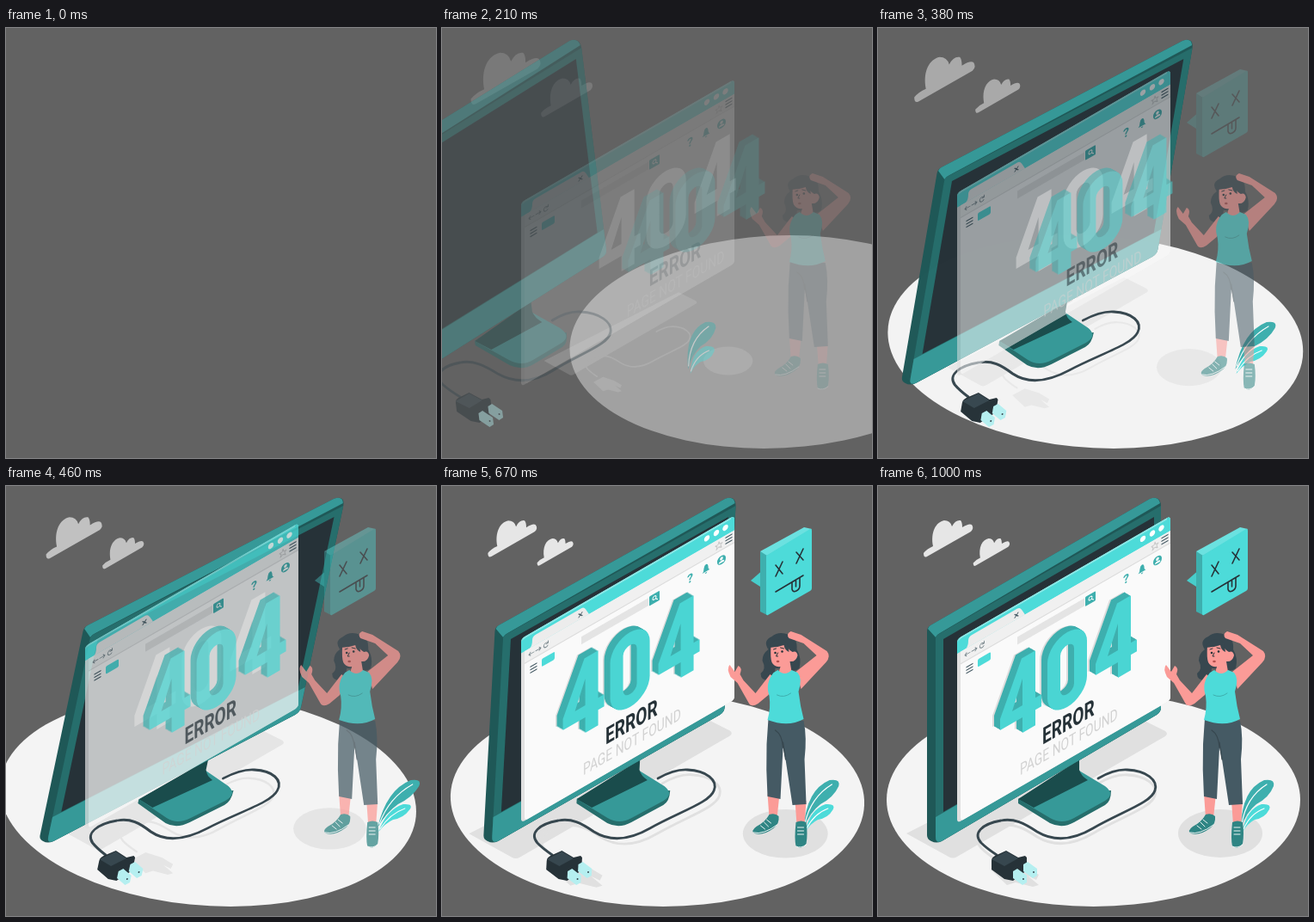
These frames come from a looping animation (500x500 px, 1.04 s). An HTML page:

```html
<!DOCTYPE html>
<html lang="en">
<head>
<meta charset="utf-8">
<title>404 error</title>
<style>
html, body { margin: 0; height: 100%; overflow: hidden; background: #626262; }
svg { display: block; width: 100%; height: 100%; }
text { font-family: Roboto, "Liberation Sans", sans-serif; }
.line { fill: none; stroke-linecap: round; stroke-linejoin: round; }
</style>
</head>
<body>
<svg viewBox="0 0 500 500">
<defs>
  <path id="cable" class="line" stroke-width="2.8" d="M256 340Q275 329 290 330C312 331 326 342 322 354C318 368 285 378 250 398C228 411 205 414 185 402C170 392 158 386 143 389C120 393 110 404 120 415Q126 421 138 429"/>
  <path id="prong" d="M157 448l5-3 11 8v8l-5 3-11-8z"/>
  <path id="cloudShape" d="M53 78Q57 73 64 70C61 54 67 42 77 40Q84 40 86 47Q90 39 96 40Q98 42 98 48Q106 43 109 45Q112 49 108 53L57 82Q53 84 53 78Z"/>
  <path id="four" d="M25 0H41V55H48V69H41V87H26V69H0V56ZM26 24V55H14Z" fill-rule="evenodd"/>
  <path id="zero" d="M0 23a23 23 0 0 1 46 0V64a23 23 0 0 1-46 0ZM15 23a8 8 0 0 1 16 0V64a8 8 0 0 1-16 0Z" fill-rule="evenodd"/>
  <g id="digits" transform="matrix(1 -.577 0 1 142 215)">
    <use href="#four"/><use href="#zero" x="55"/><use href="#four" x="111"/>
  </g>
  <path id="menu" class="line" stroke="#455a64" stroke-width="1.3" d="M0 0h7M0 3.5h7M0 7h7"/>
</defs>

<ellipse id="floor" cx="250.5" cy="365" rx="240.5" ry="124" fill="#f4f4f4"/>

<g id="shade" fill="#e0e0e0">
  <path d="M33 404L300 268L334 285Q338 288 334 291L92 431Q87 434 82 431Z"/>
  <use href="#cable" y="6" stroke="#e0e0e0"/>
  <path d="M131 446L150 436L172 443L187 452L184 458L174 453L187 464L180 466L160 461L150 464Z"/>
  <ellipse cx="398" cy="404" rx="49" ry="28"/>
</g>

<g id="clouds" fill="#e6e6e6">
  <use href="#cloudShape"/>
  <use href="#cloudShape" transform="translate(71.5 31) scale(.74 .75)"/>
</g>

<g id="monitor">
  <path fill="#266e6c" d="M163 364V369L200 392Q214 399 228 391L264 371Q271 367 271 354Z"/>
  <path fill="#369998" d="M163 364L200 386Q214 394 228 386L264 366Q276 358 264 349L234 331Z"/>
  <path fill="#1a4c4c" d="M163 364L234 318V330Q236 337 244 342L181 374Z"/>
  <path fill="#1f5857" d="M57 169Q57 164 61 162L316 15Q329 10 329 24V257Q329 263 324 266L74 413Q68 416 62 413Q57 411 57 406Z"/>
  <path fill="#369998" d="M58 166Q59 163 61 162L316 15Q326 11 328 20L72 171Q68 173 67 176Z"/>
  <path fill="#266e6c" d="M67 177Q67 174 71 172L329 23V257Q329 263 324 266L74 413Q67 416 67 408Z"/>
  <path fill="#369998" d="M67 385L329 234V257Q329 263 324 266L74 413Q67 416 67 408Z"/>
  <path fill="#263238" d="M76 178L321 36V238L76 379Z"/>
  <use href="#cable" stroke="#37474f"/>
  <path fill="#263238" d="M132 436Q132 432 136 430L149 424L163 432L171 430L173 432V447L157 459L147 457L132 446Z"/>
  <path fill="#37474f" d="M132 434L149 425L163 433L147 442Z"/>
  <g fill="#b5eff0"><use href="#prong"/><use href="#prong" x="12" y="-8"/></g>
  <g fill="#37474f"><circle cx="169" cy="457" r="1"/><circle cx="181" cy="449" r="1"/></g>
</g>

<g id="page">
  <g transform="matrix(1 -.577 0 1 92 178)">
    <rect width="248" height="214" rx="4" fill="#e0e0e0"/>
    <path fill="#fafafa" d="M4 4H248V210Q248 214 244 214H8Q4 214 4 210Z"/>
    <path fill="#4ddbd9" d="M0 17V4Q0 0 4 0H244Q248 0 248 4V17Z"/>
    <path fill="#8ae8e6" d="M1 3Q2 0 5 0H244V2H5Z"/>
    <path fill="#ececec" d="M10 17Q13 16 13 9Q13 5 17 5H70Q73 5 75 9L79 17Z"/>
    <path fill="#f0f0f0" d="M4 17H248V31H4Z"/>
    <path fill="#dcdcdc" d="M4 30.5H248V31.8H4Z"/>
    <g fill="#fff"><circle cx="216" cy="8" r="3.2"/><circle cx="227" cy="8" r="3.2"/><circle cx="237.5" cy="8" r="3.2"/></g>
    <path class="line" stroke="#455a64" stroke-width="1.1" d="M67 10l4 4M71 10l-4 4"/>
    <path class="line" stroke="#78868c" stroke-width=".9" d="M9 24h6M11 22l-2 2 2 2M17 24h6M21 22l2 2-2 2M31 22.500a2.600 2.600 0 1 0 0 3M31.500 20.500v2.500H29"/>
    <path class="line" stroke="#c8c8c8" d="M230 20l1 3h3l-2 2 1 3-3-2-3 2 1-3-2-2h3z"/>
    <use href="#menu" x="238" y="20"/>
    <use href="#menu" x="11" y="39"/>
    <rect x="24" y="37.5" width="15" height="9" rx="1.5" fill="#4ddbd9"/>
    <rect x="70" y="38" width="78" height="9" fill="#e4e4e4"/>
    <rect x="149" y="37" width="12" height="11" rx="1" fill="#3eafae"/>
    <path class="line" stroke="#fff" d="M156.5 43.5l2 2M157 42a2 2 0 1 1-4 0a2 2 0 1 1 4 0"/>
    <g fill="#3eafae">
      <text x="193" y="48" font-size="14" font-weight="700">?</text>
      <path d="M210.5 46Q212.5 45 212.5 41Q213 37.5 215 37.5T217.5 41Q217.5 45 219.5 46ZM213.5 47h3l-1.5 1.5z"/>
      <circle cx="233" cy="43" r="5"/>
    </g>
    <path fill="#fff" d="M233 39.5a1.7 1.7 0 0 1 0 3.6a1.7 1.7 0 0 1 0-3.6M229.7 46q0-2.4 3.3-2.4t3.3 2.4z"/>
  </g>
</g>

<g id="caption">
  <use href="#digits" x="-9" y="-4" fill="#dcdcdc"/>
  <text transform="matrix(.71 -.41 0 1 191 301)" font-size="27" font-weight="700" fill="#263238">ERROR</text>
  <text transform="matrix(.732 -.422 0 1 165 336.5)" font-size="19" fill="#d2d2d2">PAGE NOT FOUND</text>
</g>
<g id="number"></g>

<g id="bubble">
  <path fill="#48cdcb" d="M359 110L375 96L378 113L370 117Z"/>
  <path fill="#3eafae" d="M370 76L378 80V150L370 146Z"/>
  <path fill="#6be1e0" d="M370 76L421 48L430 50L378 81Z"/>
  <path fill="#4ddbd9" d="M377 81L428 50Q430 49 430 52V119Q430 121 428 122L379 150Q377 151 377 148Z"/>
  <path class="line" stroke="#263238" stroke-width="1.6" d="M388 92l8 10M396 88l-8 17M412 77l8 9M420 73l-8 17M388 123l32-19M407 112v8q1 4 5 2t4-6v-9M411.5 110v7"/>
</g>

<g id="plant">
  <path fill="#3eafae" d="M422 397Q423 353 449 342Q462 340 460 349Q455 362 440 370Q428 380 422 397Z"/>
  <path fill="#4ddbd9" d="M424 402Q428 376 446 370Q458 369 455 376Q450 386 438 388Q430 392 424 402Z"/>
  <path class="line" stroke="#fff" stroke-width="1.2" d="M423 393Q428 362 452 347M425 399Q433 381 449 375"/>
</g>

<g id="woman">
  <path fill="#37474f" d="M380 190Q373 180 384 175Q392 168 404 173Q414 176 413 190Q419 200 416 212Q410 217 404 213L388 212Q388 222 380 226Q371 226 371 218Q378 213 373 203Q373 195 380 190Z"/>
  <g fill="#fb9b97">
    <path d="M412 216L436 197L421 183L404 177Q400 172 406 169L418 173L448 192Q453 198 447 205L418 236Z"/>
    <path d="M388 224L380 243L368 253Q360 258 357 252L344 229L336 222Q331 212 335 208L341 216L345 209Q350 211 347 219L351 226L365 241L382 219Z"/>
    <path d="M383 185Q382 200 384 205Q387 211 394 210L392 217Q399 226 407 216L405 204Q412 205 414 197Q413 191 408 193Q402 190 401 183Q392 187 388 183Z"/>
    <path d="M379 358H393L390 386H381ZM411 366H424L422 394H413Z"/>
  </g>
  <path fill="#37474f" d="M381 188Q384 179 393 178Q403 178 404 193Q399 191 398 185Q390 188 381 188Z"/>
  <path class="line" stroke="#263238" stroke-width="1" d="M386 190l3-1M394 188l4 1M391 194l-2 4 2 0"/>
  <g fill="#263238"><circle cx="388" cy="194" r="1.3"/><circle cx="396" cy="192.5" r="1.3"/><ellipse cx="391" cy="204" rx="1.8" ry="1.2" fill="#b4514f"/></g>
  <path fill="#455a64" d="M380 270L421 273Q425 292 422 318L424 370L408 371L400 318L397 304L394 364L379 361Q377 330 378 300Z"/>
  <path class="line" stroke="#37474f" stroke-width="1.2" d="M397 304Q396 289 388 284M400 318L397 298"/>
  <path fill="#4ddbd9" d="M386 217L391 214Q399 222 407 214L414 217Q420 224 415 239Q417 256 421 271Q403 281 379 272Q383 258 381 244Q376 229 386 217Z"/>
  <path class="line" stroke="#3eafae" d="M390 243Q398 247 406 241"/>
  <path fill="#2f8584" d="M381 382Q388 380 392 384Q393 393 386 398Q374 407 364 404Q359 401 366 396Q376 391 381 382ZM412 391Q418 388 424 391Q426 405 424 416Q419 423 412 419Q410 410 412 391Z"/>
  <path class="line" stroke="#fff" stroke-width=".9" d="M375 391l5 5M378 388l5 4M371 395l5 4M414 397h7M414 401h7M414 405h7M363 403Q374 406 390 394M412 419q6 3 12-2"/>
</g>
</svg>

<script>
const $ = id => document.getElementById(id);
const LOOP = 1040, FPS = 24, DEPTH = 7;

// Extrude the digits back into the page, then put the face on top.
for (let i = DEPTH; i >= 0; i--) {
  const layer = document.createElementNS("http://www.w3.org/2000/svg", "use");
  layer.setAttribute("href", "#digits");
  layer.setAttribute("transform", `translate(${-i} ${-.577 * i})`);
  layer.setAttribute("fill", i ? "#3eafae" : "#4ad5d3");
  $("number").append(layer);
}

function bezier(x1, y1, x2, y2) {
  const at = (a, b, s) => 3 * (1 - s) ** 2 * s * a + 3 * (1 - s) * s * s * b + s ** 3;
  return x => {
    if (x <= 0 || x >= 1) return x <= 0 ? 0 : 1;
    let lo = 0, hi = 1;
    for (let i = 0; i < 24; i++) {
      const mid = (lo + hi) / 2;
      if (at(x1, x2, mid) < x) lo = mid; else hi = mid;
    }
    return at(y1, y2, lo);
  };
}
const slow = bezier(.36, -.01, .42, 1.38);
const fast = bezier(.43, -.01, .37, 1.38);

const clamp = v => Math.min(1, Math.max(0, v));

function pose(id, opacity, transform) {
  $(id).setAttribute("opacity", clamp(opacity));
  if (transform) $(id).setAttribute("transform", transform);
}
const move = (x, y = 0) => `translate(${x} ${y})`;
const zoom = (k, x, y) => `translate(${x} ${y}) scale(${k}) translate(${-x} ${-y})`;
const lean = (dx, deg, y) => `translate(${dx} ${y}) skewX(${deg}) translate(0 ${-y})`;

function leanAngle(p) {
  if (p < .6) return 20 - 30 * fast(p / .6);
  if (p < .8) return -10 + 11 * (1 - (1 - (p - .6) / .2) ** 2.4);
  return 1 - fast((p - .8) / .2);
}

function draw(p) {
  const a = slow(p), rest = 1 - a;
  const b = fast(p / .6), dash = 245 * (1 - b), angle = leanAngle(p);
  pose("floor", b, lean(dash, -angle, 365));
  pose("monitor", b, lean(-dash, angle, 250));
  pose("plant", b, lean(-dash, angle, 372));
  pose("shade", a, zoom(1 - rest / 2, 240, 363));
  pose("clouds", a, zoom(1 + rest / 2, 100, 67));
  pose("page", a, move(0, 30 * rest));
  pose("caption", a, move(60 * rest));
  pose("number", a, move(90 * rest));
  pose("woman", a, move(30 * rest));
  pose("bubble", clamp((p - .25) / .4) ** 1.4);
}

function tick() {
  const t = performance.now() % LOOP;
  const step = Math.min(FPS, Math.floor((t + 4) * FPS / 1000));
  draw(step < 2 ? 0 : step / FPS);
  requestAnimationFrame(tick);
}
tick();
</script>
</body>
</html>
```
